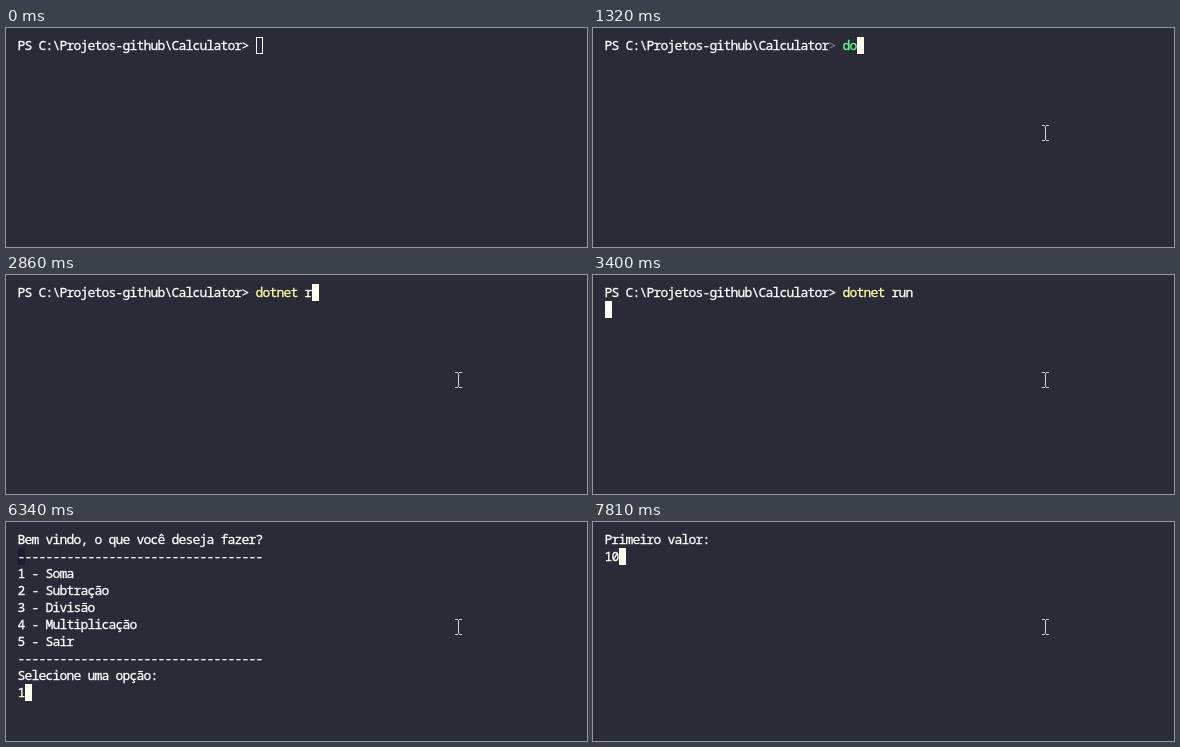
An HTML page for the animation above (8 s loop, 581 by 219 pixels).

```html
<!DOCTYPE html>
<html lang="pt">
<head>
<meta charset="utf-8">
<title>Terminal</title>
<style>
html, body { margin: 0; width: 100%; height: 100%; overflow: hidden; background: #292b36; }
svg { display: block; width: 581px; height: 219px; }
text { font: 500 13px "Noto Sans Mono", monospace; letter-spacing: -.8px; white-space: pre; stroke-width: .3px; }
</style>
</head>
<body>
<svg id="stage" viewBox="0 0 581 219" xmlns="http://www.w3.org/2000/svg">
  <rect width="581" height="219" fill="#292b36"/>
  <rect id="stain" x="12" y="26" width="7" height="17" fill="#1c1c38"/>
  <g id="lines"></g>
  <rect id="caret"/>
  <path id="mouse" d="M-3-7.5H0M1-7.5H4M-3 7.5H0M1 7.5H4M.5-7V7" fill="none" stroke="#d2d2c8"/>
</svg>
<script>
const LOOP = 8000, LEFT = 12, TOP = 9, CELL = 7, ROW = 17;
const WHITE = '#fff', YELLOW = '#ffffa5', GREEN = '#69ff94', DIM = '#74747a';
const PATH = 'PS C:\\Projetos-github\\Calculator';
const COMMAND = 'dotnet run', CMD_COL = PATH.length + 2;
const RULE = '-'.repeat(35);
const MENU = ['Bem vindo, o que você deseja fazer?', RULE, '1 - Soma', '2 - Subtração',
  '3 - Divisão', '4 - Multiplicação', '5 - Sair', RULE, 'Selecione uma opção:'];

// When each command character appears; BLINK is the caret gap just before it.
const KEYS = [1120, 1320, 1480, 1670, 1830, 2340, 2670, 2860, 3010, 3170];
const NO_GAP = [1120, 1480], BLINK = 30;
const ENTER = 3400, CLEAR = 4910, SHOW_MENU = 4940, CHOICE = 6340,
  CONFIRM = 6930, ASK = 6960, DIGITS = [7600, 7810];
const MOVE = 110, FOCUS = 450, STEP = 38;

const $ = id => document.getElementById(id);
const set = (el, attrs) => { for (const k in attrs) el.setAttribute(k, attrs[k]); };
const escapeText = s => s.replace(/&/g, '&amp;').replace(/</g, '&lt;').replace(/>/g, '&gt;');
const span = (s, col = 0, row = 0, color = WHITE) =>
  `<text x="${LEFT - 0.4 + col * CELL}" y="${TOP + 13 + row * ROW}" fill="${color}" stroke="${color}">${escapeText(s)}</text>`;
const countUntil = (times, t) => times.filter(k => t >= k).length;

function promptLine(t) {
  const typed = COMMAND.slice(0, countUntil(KEYS, t));
  const keyword = typed === 'do';
  const [name, arg = ''] = typed.split(' ');
  return span(PATH) + span('>', PATH.length, 0, keyword ? DIM : WHITE) +
    span(name, CMD_COL, 0, keyword ? GREEN : YELLOW) +
    span(arg, CMD_COL + 7);
}

function screen(t) {
  if (t < CLEAR) {
    const hidden = KEYS.some(k => !NO_GAP.includes(k) && t >= k - BLINK && t < k);
    const caret = t >= ENTER ? [0, 1] : [CMD_COL + countUntil(KEYS, t), 0];
    return { body: promptLine(t), caret, hidden };
  }
  if (t < SHOW_MENU) return { body: '', caret: [0, 1] };
  if (t < ASK) {
    const chosen = t >= CHOICE;
    const body = MENU.map((s, i) => span(s, 0, i)).join('') + (chosen ? span('1', 0, 9) : '');
    return { body, caret: t >= CONFIRM ? [0, 10] : [chosen ? 1 : 0, 9], menu: true };
  }
  const value = '10'.slice(0, countUntil(DIGITS, t));
  return { body: span('Primeiro valor:') + span(value, 0, 1), caret: [value.length, 1] };
}

let shown = null;
function draw(t) {
  const { body, caret: [col, row], hidden, menu } = screen(t);
  if (body !== shown) $('lines').innerHTML = shown = body;
  $('stain').style.display = menu ? '' : 'none';

  const inset = t < FOCUS ? 0.5 : 0;
  set($('caret'), {
    x: LEFT + col * CELL + inset, y: TOP + row * ROW + inset,
    width: CELL - 2 * inset, height: ROW - 2 * inset,
    fill: inset ? 'none' : '#fffff0', stroke: inset ? '#f8f8f2' : 'none',
    visibility: hidden ? 'hidden' : 'visible'
  });

  // The pointer glides in from the lower right and slows to rest.
  const p = Math.min(1, Math.max(0, Math.floor((t - MOVE) / STEP) / 8));
  const rest = (1 - p) ** 2;
  set($('mouse'), {
    transform: `translate(${Math.round(452 + 62 * rest)} ${Math.round(105 + 96 * rest)})`,
    visibility: t < MOVE ? 'hidden' : 'visible'
  });
}

const start = performance.now();
function tick() {
  draw((performance.now() - start) % LOOP);
  requestAnimationFrame(tick);
}
draw(0);
requestAnimationFrame(tick);
</script>
</body>
</html>
```
